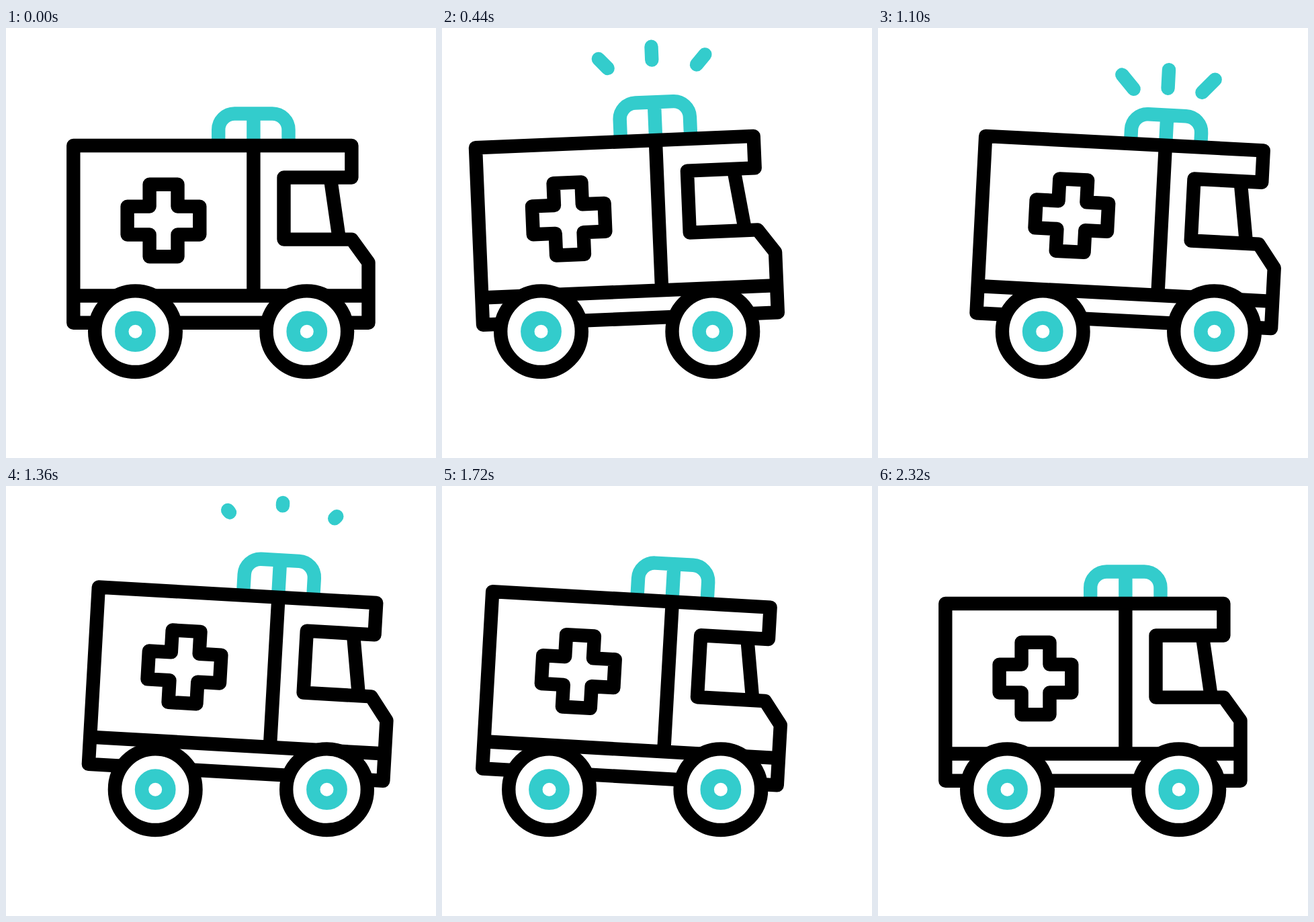
Recreate the animation shown at these times as an HTML page. Size 640 by 640 pixels, loop 2.42 s.

```html
<!DOCTYPE html>
<html lang="en">
<head>
<meta charset="utf-8">
<title>Ambulance</title>
<style>
  html, body { margin: 0; width: 100%; height: 100%; overflow: hidden; background: #fff; }
  svg { display: block; width: 100%; height: 100%; }
  .line { fill: none; stroke: #000; stroke-width: 20.4; stroke-linejoin: round; }
  .cyan { fill: none; stroke: #33cccc; stroke-width: 20.4; }
  .ray { stroke-linecap: round; }
</style>
</head>
<body>
<svg viewBox="0 0 640 640">
  <g id="body">
    <g id="beacon">
      <path class="cyan" d="M316.2 177V151.500a24 24 0 0 1 24-24H396.500a24 24 0 0 1 24 24V177M368.400 127.500V177"/>
      <g id="rays"></g>
    </g>
    <path class="line" d="M100.300 175H514.400V222.500H413.500V314.600H514.500L539.500 349V438.800H100.300Z"/>
    <path class="line" d="M368.400 175V398.500M100.300 398.500H539.500M482.700 222.500L496 314.600"/>
    <path class="line" d="M213.600 232.700H255.500V265.600H288.300V307.500H255.500V340.200H213.600V307.500H180.600V265.600H213.600Z"/>
  </g>
  <g id="wheels">
    <g id="wheel">
      <circle cx="192.500" cy="451.700" r="60.300" fill="#fff" stroke="#000" stroke-width="20.400"/>
      <circle class="cyan" cx="192.500" cy="451.700" r="20.200"/>
    </g>
    <use href="#wheel" x="255.300"/>
  </g>
</svg>
<script>
const LOOP = 2420, END = 2320;
const $ = id => document.getElementById(id);

// Keys are [time, value] pairs, eased in and out between neighbours.
const drive = [[0, 0], [580, -52.6], [1156, 55.5], [1730, -33], [2260, 0]];
const tilt = [[0, 0], [595, -2.88], [1175, 3.25], [1735, 3.25], [END, 0]];
const bounce = [[0, 0], [335, -7], [830, 3.1], [1496, -14.5], [1900, 0]];
const pop = [[0, 0], [380, -9.6], [980, 4.5], [1500, -10.6], [END, 0]];

// Each ray runs outward from its first point to its second.
const rays = [
  [322.4, 97.4, 286.3, 57.7],
  [367.5, 96, 367.5, 42],
  [413, 97.4, 448.7, 57.7]
];
const bursts = [{ head: 50, tail: 189 }, { head: 822, tail: 987 }];
const GROW = 454;

const clamp = v => Math.max(0, Math.min(1, v));
const ease = v => { const s = clamp(v); return s * s * (3 - 2 * s); };
const mix = (a, b, k) => a + (b - a) * k;

function at(keys, t) {
  for (let i = 1; i < keys.length; i++) {
    const [t0, v0] = keys[i - 1], [t1, v1] = keys[i];
    if (t < t1) return mix(v0, v1, ease((t - t0) / (t1 - t0)));
  }
  return keys[keys.length - 1][1];
}

const lines = rays.map(() => {
  const el = document.createElementNS("http://www.w3.org/2000/svg", "path");
  el.setAttribute("class", "cyan ray");
  $("rays").appendChild(el);
  return el;
});

function drawRays(t) {
  const burst = bursts.find(b => t > b.head && t < b.tail + GROW);
  $("rays").style.display = burst ? "" : "none";
  if (!burst) return;
  const head = ease((t - burst.head) / GROW);
  const tail = ease((t - burst.tail) / GROW);
  rays.forEach(([x0, y0, x1, y1], i) => {
    const point = k => `${mix(x0, x1, k)} ${mix(y0, y1, k)}`;
    lines[i].setAttribute("d", `M${point(tail)}L${point(head)}`);
  });
}

function draw(t) {
  const x = at(drive, t), rad = at(tilt, t) * Math.PI / 180, lift = at(pop, t);
  $("wheels").setAttribute("transform", `translate(${x} 0)`);
  $("body").setAttribute("transform",
    `translate(${x} ${at(bounce, t)}) rotate(${at(tilt, t)} 313.5 307)`);
  // The beacon rises straight up on the stage, whatever the tilt.
  $("beacon").setAttribute("transform",
    `translate(${lift * Math.sin(rad)} ${lift * Math.cos(rad)})`);
  drawRays(t);
}

function tick() {
  draw(Math.min(performance.now() % LOOP, END));
  requestAnimationFrame(tick);
}
tick();
</script>
</body>
</html>
```
